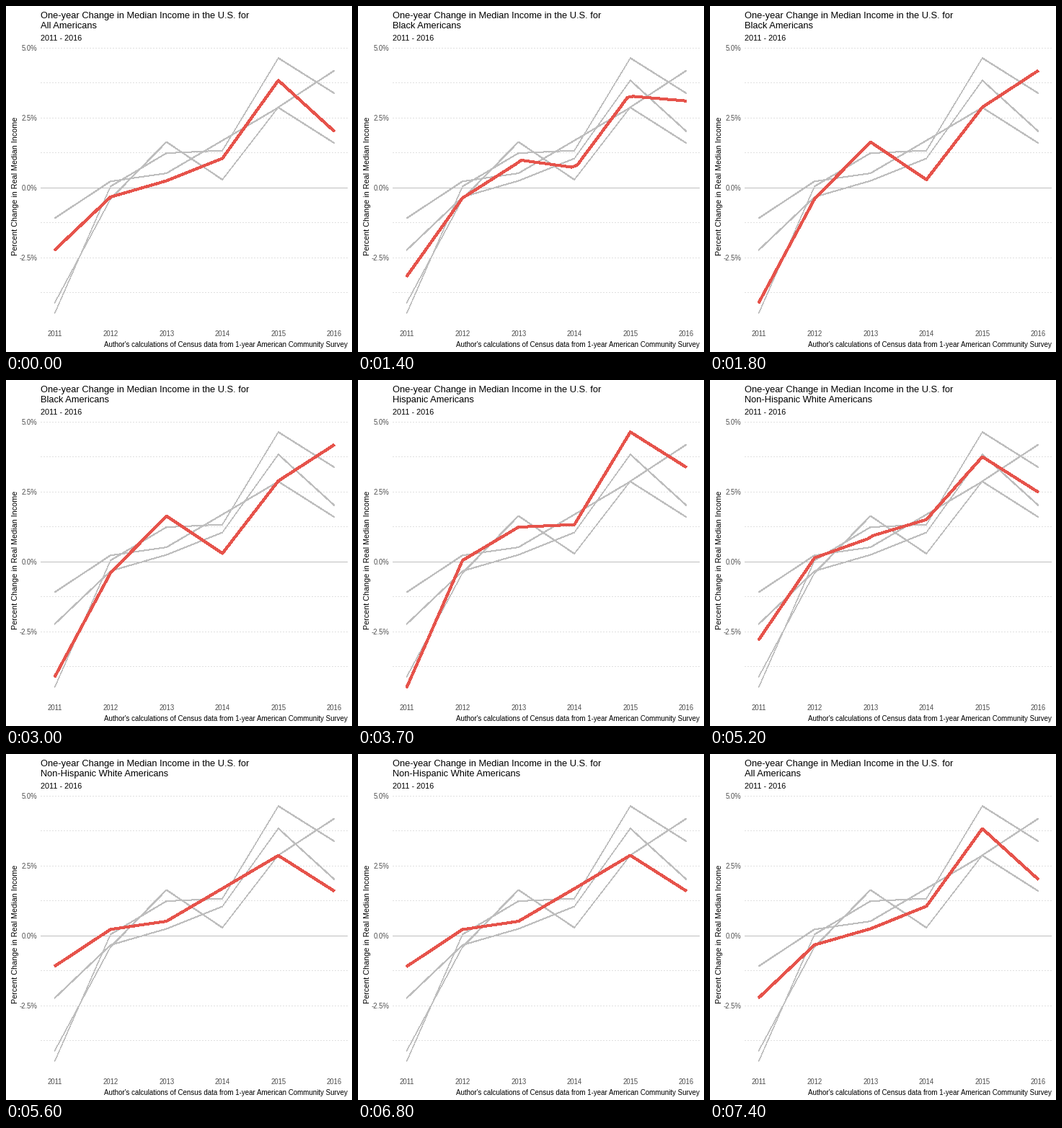
These frames come from a looping animation (480x480 px, 7.5 s). A matplotlib script:

```python
import numpy as np
import matplotlib.pyplot as plt
from matplotlib.animation import FuncAnimation

SIZE, DPI = 480, 96
PX = 72 / DPI                      # points per pixel
FRAMES, STEP_MS = 75, 100
MOVE = 8                           # steps per transition
STARTS = (10, 29, 48, 67)          # last still frame before each transition

RED, GREY, GRID = "#E6534B", "#BEBEBE", "#E0E0E0"
LEFT, RIGHT = 48, 474

# percent change per year, 2011 to 2016
GROUPS = {
    "All Americans": (-2.23, -0.33, 0.25, 1.05, 3.84, 2.02),
    "Black Americans": (-4.12, -0.40, 1.64, 0.29, 2.88, 4.19),
    "Hispanic Americans": (-4.50, 0.05, 1.24, 1.33, 4.64, 3.38),
    "Non-Hispanic White Americans": (-1.09, 0.23, 0.52, 1.69, 2.87, 1.60),
}
NAMES = list(GROUPS)

plt.rcParams["font.family"] = "Liberation Sans"


def to_x(year):
    return 67.4 + 77.6 * (np.asarray(year) - 2011)


def to_y(pct):
    return 252.2 - 38.8 * np.asarray(pct)


def densify(values, n=50):
    """Spread n points over the path; the shortest edge gets one fewer."""
    edges = np.abs(np.diff(values))
    counts = np.full(len(edges), 10)
    counts[np.argmin(edges)] -= 10 * len(edges) + 1 - n
    knots = np.concatenate([[0], np.cumsum(counts)])
    idx = np.arange(n)
    years = np.interp(idx, knots, np.arange(2011, 2017))
    return np.array([to_x(years), to_y(np.interp(idx, knots, values))])


def cubic_in_out(p):
    return 4 * p ** 3 if p < 0.5 else 1 - 4 * (1 - p) ** 3


def phase(frame):
    """Return (from state, to state, linear progress)."""
    for i, start in enumerate(STARTS):
        if frame <= start:
            return i, i, 0.0
        if frame < start + MOVE:
            return i, (i + 1) % len(NAMES), (frame - start) / MOVE
    return 0, 0, 0.0


fig = plt.figure(figsize=(SIZE / DPI, SIZE / DPI), dpi=DPI, facecolor="white")
ax = fig.add_axes([0, 0, 1, 1])
ax.set_xlim(0, SIZE)
ax.set_ylim(SIZE, 0)
ax.axis("off")


def label(x, y, text, size, color="black", **kw):
    return ax.text(x, y, text, fontsize=size * PX, color=color,
                   va="baseline", **kw)


def rule(pct, color, **kw):
    """One-pixel horizontal line filling a whole pixel row."""
    row = np.floor(to_y(pct)) + 0.5
    ax.plot([LEFT, RIGHT], [row, row], color=color, lw=PX, snap=False,
            solid_capstyle="butt", dash_capstyle="butt", **kw)


def stroke(x, y, width, color, **kw):
    # without antialiasing every touched pixel fills, adding about one pixel
    return ax.plot(x, y, color=color, lw=width * PX, antialiased=False,
                   solid_capstyle="butt", solid_joinstyle="round", **kw)[0]


# grid and axes
for pct in np.arange(-3.75, 5.1, 1.25):
    if pct:
        rule(pct, GRID, linestyle=(0, (2, 2)))
rule(0, GREY)

for pct in (-2.5, 0, 2.5, 5):
    label(43.3, to_y(pct) + 3.8, f"{pct:.1f}%", 9.5, "#4D4D4D", ha="right")
for year in range(2011, 2017):
    label(to_x(year), 458, str(year), 9.5, "#4D4D4D", ha="center")

label(47.6, 17, "One-year Change in Median Income in the U.S. for", 12.9)
title = label(47.6, 31, NAMES[0], 12.9)
label(47.8, 48, "2011 - 2016", 10.9)
label(16, 249.7, "Percent Change in Real Median Income", 10.75,
      rotation=90, rotation_mode="anchor", ha="center")
label(474.3, 473, "Author's calculations of Census data from 1-year "
      "American Community Survey", 9.7, ha="right")

# resting lines; steep pieces are drawn finer
years = to_x(np.arange(2011, 2017))
for values in GROUPS.values():
    ys = to_y(values)
    for k in range(5):
        steep = abs(ys[k + 1] - ys[k]) > 1.1 * (years[k + 1] - years[k])
        stroke(years[k:k + 2], ys[k:k + 2], 0.4 if steep else 1, GREY)

PATHS = [densify(v) for v in GROUPS.values()]
hero = stroke(*PATHS[0], 3, RED, zorder=5)


def draw(frame):
    a, b, p = phase(frame)
    e = cubic_in_out(p)
    hero.set_data(*(PATHS[a] * (1 - e) + PATHS[b] * e))
    title.set_text(NAMES[b if p >= 0.5 else a])
    return hero, title


anim = FuncAnimation(fig, draw, frames=FRAMES, interval=STEP_MS,
                     init_func=lambda: draw(0), repeat=True, repeat_delay=0)
plt.show()
```
